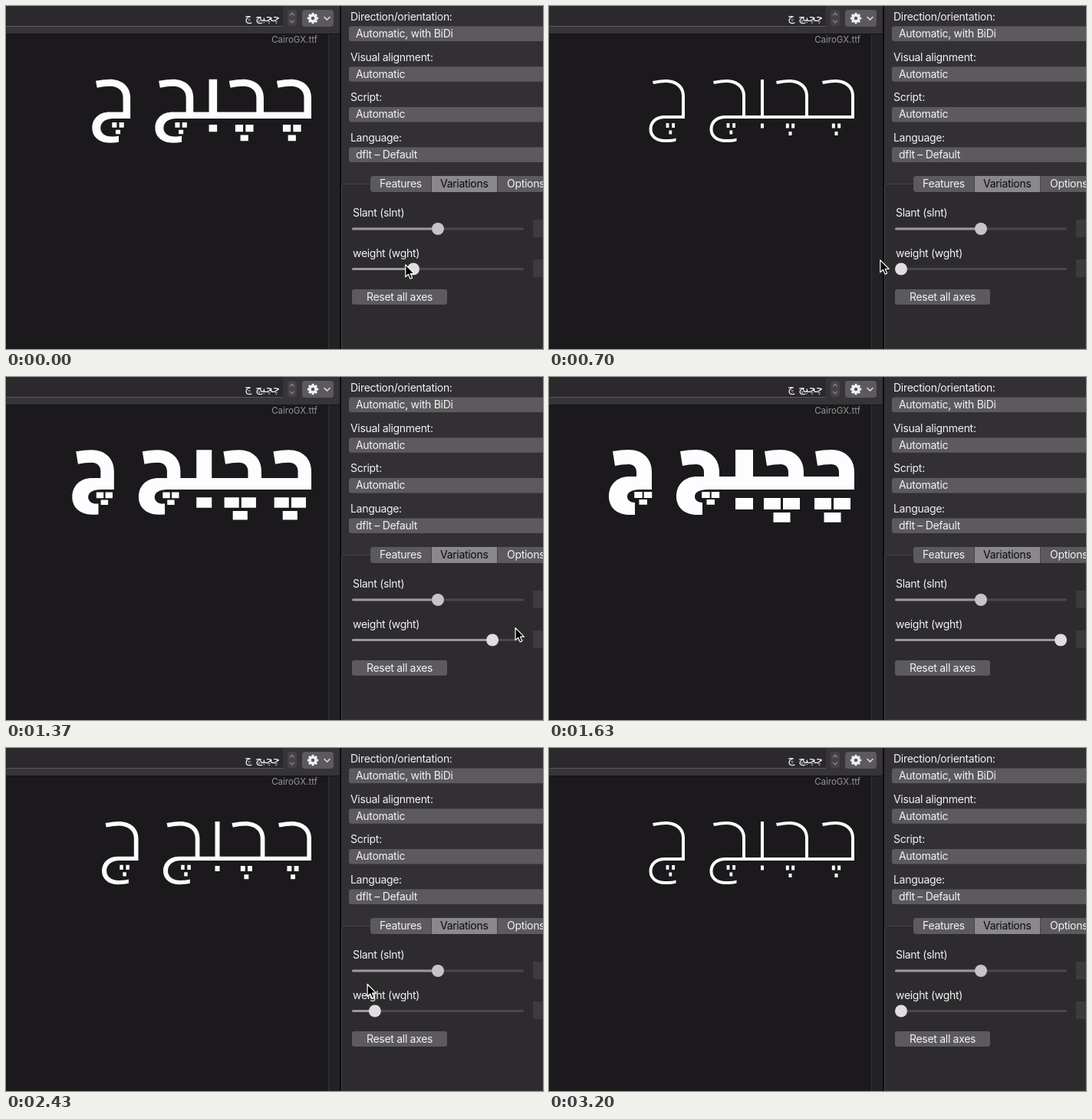
An HTML page that plays this animation: 700x448 px, repeating every 4230 ms.

```html
<!DOCTYPE html>
<html lang="en">
<head>
<meta charset="utf-8">
<title>Variable font weight</title>
<style>
  html, body { margin: 0; width: 100%; height: 100%; overflow: hidden; background: #1b191b; }
  svg { display: block; width: 700px; height: 448px; }
  text { font: 14px Inter, Roboto, sans-serif; letter-spacing: -.3px; fill: #f3f2f4; }
  .file { font-size: 11.5px; letter-spacing: 0; fill: #969497; }
  .sample { font: 14.5px "DejaVu Sans", sans-serif; letter-spacing: 0; }
  .selected { fill: #0c0b0d; }
  .control { fill: #5c5a5d; }
  .rail { fill: #4a484b; }
  .filled { fill: #9b999c; }
  .line { fill: none; stroke-width: 1.5; stroke-linecap: round; stroke-linejoin: round; }
</style>
</head>
<body>
<svg viewBox="0 0 700 448">
  <!-- toolbar and preview -->
  <rect width="436" height="37" fill="#363437"/>
  <rect width="361" height="27" fill="#2b292c"/>
  <rect y="26" width="361" height="1" fill="#5a585b"/>
  <rect y="36" width="436" height="1" fill="#151416"/>
  <text class="sample" x="357" y="20" direction="rtl">چچبچ چ</text>
  <rect x="367" y="5" width="12" height="21" rx="4" fill="#454346"/>
  <path class="line" stroke="#7d7b7e" d="M370.5 12l2.5-3 2.5 3M370.5 19l2.5 3 2.5-3"/>
  <rect class="control" x="386" y="5" width="41" height="22" rx="4"/>
  <g id="gear" fill="#f1f0f2">
    <circle cx="400" cy="16" r="4" fill="none" stroke="#f1f0f2" stroke-width="3.4"/>
  </g>
  <path class="line" stroke="#e5e4e6" d="M415 14.5l3.5 3.5 3.5-3.5"/>
  <rect x="420" y="37" width="16" height="411" fill="#222123"/>
  <rect x="420" y="37" width="1" height="411" fill="#333134"/>
  <text class="file" x="406" y="48" text-anchor="end">CairoGX.ttf</text>
  <path id="word" fill="#fdfdff"/>

  <!-- inspector -->
  <rect x="435" width="2" height="448" fill="#0c0b0d"/>
  <rect x="437" width="263" height="448" fill="#323033"/>
  <path d="M437.5 448V237q0-4.5 4.5-4.5H700V448Z" fill="#2d2b2e" stroke="#454346"/>
  <g id="menus"></g>
  <path class="control" d="M479 222H700V243H479q-4 0-4-4V226q0-4 4-4Z"/>
  <rect x="555" y="222" width="85" height="21" fill="#8a888b"/>
  <path d="M554.5 222v21M640.5 222v21" stroke="#454346"/>
  <text x="487" y="237">Features</text>
  <text class="selected" x="566" y="237">Variations</text>
  <text x="653" y="237">Options</text>

  <text x="452" y="275">Slant (slnt)</text>
  <rect class="rail" x="451" y="289.5" width="224" height="3" rx="1.5"/>
  <rect class="filled" x="451" y="289.5" width="112" height="3" rx="1.5"/>
  <circle cx="563" cy="291" r="8" fill="#c6c4c7"/>
  <text x="452" y="328">weight (wght)</text>
  <rect class="rail" x="451" y="342" width="224" height="3" rx="1.5"/>
  <rect class="filled" id="fill" x="451" y="342" height="3" rx="1.5"/>
  <circle id="knob" cy="343.5" r="8" fill="#dfdde0"/>
  <g fill="#3d3b3e">
    <rect x="687" y="279" width="20" height="23"/>
    <rect x="687" y="331" width="20" height="23"/>
  </g>
  <rect class="control" x="451" y="370" width="124" height="20" rx="3"/>
  <text x="470" y="385">Reset all axes</text>

  <path id="cursor" d="M.8 .8v16l3.7-3.300 2.500 5.700 2.600-1.100-2.400-5.600h5Z"
        fill="#000" stroke="#fff" stroke-width="1.2" stroke-linejoin="round"/>
</svg>
<script>
const LOOP = 4230, BASELINE = 147, END = 398;
const KNOB_MIN = 459, KNOB_MAX = 667;
const $ = id => document.getElementById(id);
const mix = (a, b, k) => a + (b - a) * k;

function add(parent, tag, attrs, text = '') {
  const el = document.createElementNS('http://www.w3.org/2000/svg', tag);
  for (const name in attrs) el.setAttribute(name, attrs[name]);
  el.textContent = text;
  parent.appendChild(el);
}

[['Direction/orientation:', 'Automatic, with BiDi'], ['Visual alignment:', 'Automatic'],
 ['Script:', 'Automatic'], ['Language:', 'dflt – Default']].forEach(([label, value], i) => {
  const y = i * 52.7;
  add($('menus'), 'text', { x: 449, y: 19 + y }, label);
  add($('menus'), 'rect', { class: 'control', x: 447, y: 26.5 + y, width: 260, height: 19.5, rx: 3 });
  add($('menus'), 'text', { x: 456, y: 41 + y }, value);
});
for (let a = 0; a < 360; a += 45)
  add($('gear'), 'rect', { x: 398.6, y: 8.8, width: 2.8, height: 3, transform: `rotate(${a} 400 16)` });

const box = (x, y, w, h) => `M${x} ${y}h${w}v${h}h${-w}Z`;

// Rounded corners that leave the first point horizontally or vertically.
const turnDown = (x0, y0, x1, y1) =>
  `L${x0} ${y0}C${mix(x0, x1, .6)} ${y0} ${x1} ${mix(y1, y0, .6)} ${x1} ${y1}`;
const turnSide = (x0, y0, x1, y1) =>
  `L${x0} ${y0}C${x0} ${mix(y0, y1, .6)} ${mix(x1, x0, .6)} ${y1} ${x1} ${y1}`;

// The whole word at weight k, from light (0) to black (1).
function wordPath(k) {
  const w = (light, black) => mix(light, black, k);
  const stem = w(4, 20), top = w(96, 95), barTop = w(143, 130);

  const arm = right => {
    const left = right - w(42, 51), inner = right - stem, shoulder = right - w(25, 30);
    const under = top + w(4, 19), bend = w(117, 124);
    return `M${left} ${top + 2}Q${left + 11} ${top} ${shoulder} ${top}` +
      turnDown(shoulder, top, right, bend) + `V${BASELINE}H${inner}` +
      turnSide(inner, bend, shoulder, under) +
      `Q${left + 11} ${under} ${left + w(1, 3)} ${under + 2}Z`;
  };
  const bowl = right => {
    const left = right - w(46.5, 56), hole = right - w(42.5, 32), tip = right - w(11.5, 22);
    const center = right - w(26, 29), neck = right - w(26, 16), throat = right - w(26, 22);
    const bottom = w(178, 180), floor = w(174, 164), side = w(161, 156);
    return `M${right} ${BASELINE}` + turnDown(neck, BASELINE, hole, side) +
      turnSide(hole, side, throat, floor) +
      `Q${tip - 3} ${floor} ${tip} ${floor - w(1.5, 0)}V${bottom - w(1.5, 0)}` +
      `Q${tip - 5} ${bottom} ${center} ${bottom}` + turnDown(center, bottom, left, side) +
      turnSide(left, side, center, barTop) + `H${right}Z`;
  };
  const trio = (center, y, width, height, pitch, drop) =>
    [[-pitch / 2, 0, 1], [pitch / 2, 0, 1], [0, drop, .85]].map(([dx, dy, scale]) =>
      box(center + dx - width / 2, y + dy, width, height * scale)).join('');

  const lowerDots = right =>
    trio(right - w(23.5, 28.5), w(153.5, 158), w(4, 22), w(6, 15), w(7.3, 25), w(10.5, 19));
  const medial = right => arm(right) + lowerDots(right);
  const final = right => arm(right) + bowl(right) +
    trio(right - w(18.7, 11.3), w(153, 150), w(3.8, 10.5), w(6, 8), w(7.6, 12.5), w(9.5, 10));

  const tooth = END - w(118, 132), toothWidth = w(4, 23), joint = END - w(142, 176);
  return final(END - w(221, 264)) + final(joint) + medial(END - w(60, 66)) + medial(END) +
    box(tooth - toothWidth, top, toothWidth, BASELINE - top) +
    box(tooth - toothWidth, w(153.5, 158), toothWidth, w(6, 15)) +
    box(joint - stem, barTop, END - joint + stem, BASELINE - barTop);
}

// Moves: start and end time, start and end position.
const knobMoves = [
  [30, 430, [531], [KNOB_MIN]],
  [780, 1560, [KNOB_MIN], [KNOB_MAX]],
  [2040, 2515, [KNOB_MAX], [KNOB_MIN]]
];
const cursorMoves = [
  [30, 500, [520, 337], [431, 331]],
  [720, 1600, [431, 331], [712, 326]],
  [2030, 2530, [660, 320], [444, 306]],
  [2570, 2800, [444, 306], [415, 307]],
  [2970, 3080, [415, 307], [500, 235]],
  [3080, 3200, [500, 235], [368, 452]]
];
const easeOut = k => 1 - (1 - k) ** 1.3;

function at(moves, t) {
  const [start, end, from, to] = moves.findLast(move => move[0] <= t) || moves[0];
  const k = easeOut(Math.min(1, Math.max(0, (t - start) / (end - start))));
  return from.map((v, i) => mix(v, to[i], k));
}

function draw(t) {
  const [knob] = at(knobMoves, t);
  $('word').setAttribute('d', wordPath((knob - KNOB_MIN) / (KNOB_MAX - KNOB_MIN)));
  $('knob').setAttribute('cx', knob);
  $('fill').setAttribute('width', knob - 451);
  $('cursor').setAttribute('transform', `translate(${at(cursorMoves, t)})`);
}

const start = performance.now();
function tick() {
  draw((performance.now() - start) % LOOP);
  requestAnimationFrame(tick);
}
tick();
</script>
</body>
</html>
```
